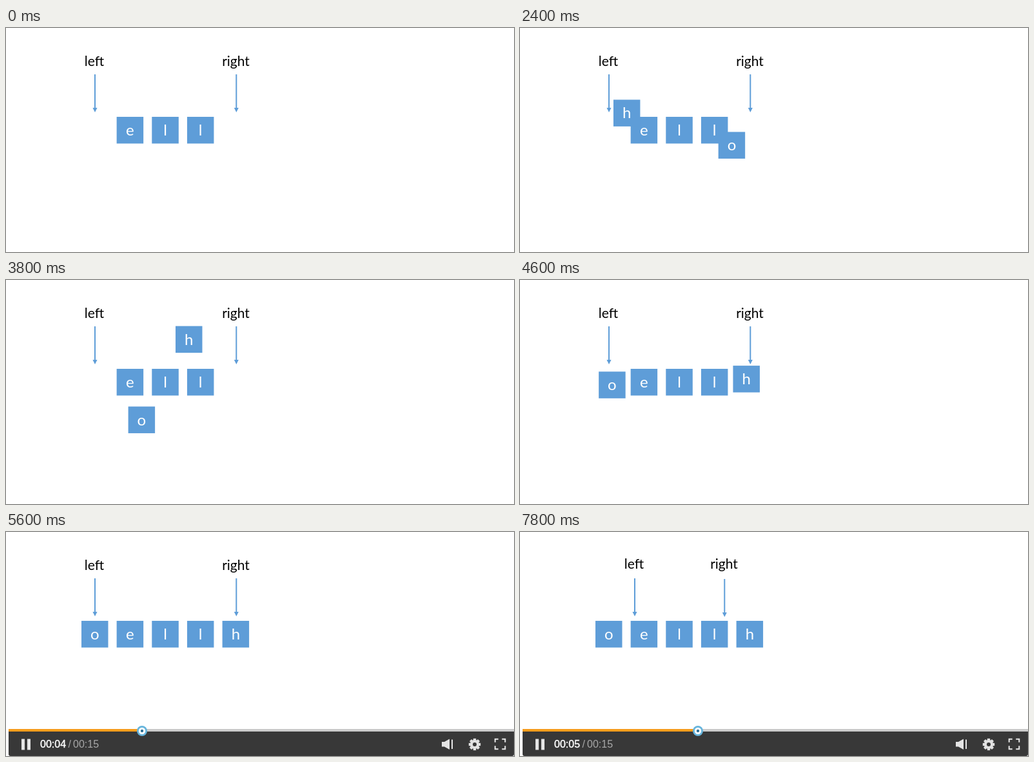
An HTML page with a canvas that plays this animation: 788x348 px, repeating every 8 s.

```html
<!DOCTYPE html>
<html lang="en">
<head>
<meta charset="utf-8">
<title>Swap with two pointers</title>
<style>
  html, body { margin: 0; width: 100%; height: 100%; overflow: hidden; background: #fff; }
  canvas { display: block; }
</style>
</head>
<body>
<canvas id="stage" width="788" height="348"></canvas>
<script>
const ctx = document.getElementById('stage').getContext('2d');
const LOOP = 8000, STEP = 200;
const BLUE = '#5e9dd8';
const SIZE = 41.5, ROW = 138, FIRST = 117, PITCH = 54.65;
const SPAN = PITCH * 4;

const clamp = v => Math.max(0, Math.min(1, v));
const slotX = i => FIRST + PITCH * i;

function rect(x, y, w, h, color) {
  ctx.fillStyle = color;
  ctx.fillRect(x, y, w, h);
}

function disc(x, y, r, color) {
  ctx.fillStyle = color;
  ctx.beginPath();
  ctx.arc(x, y, r, 0, Math.PI * 2);
  ctx.fill();
}

function poly(points, color) {
  ctx.fillStyle = color;
  ctx.beginPath();
  points.forEach(([x, y]) => ctx.lineTo(x, y));
  ctx.fill();
}

function text(str, x, y, font, color, align = 'center') {
  ctx.font = font;
  ctx.fillStyle = color;
  ctx.textAlign = align;
  ctx.fillText(str, x, y);
}

function tile(letter, x, y) {
  rect(x, y, SIZE, SIZE, BLUE);
  text(letter, x + SIZE / 2, y + 29, '24px Lato, Carlito, sans-serif', '#fff');
}

function pointer(label, textX, arrowX, lift, drop) {
  text(label, textX, 58.5 - lift, '21px Lato, Carlito, sans-serif', '#000');
  rect(arrowX - 1, 72 + drop, 2, 53, BLUE);
  poly([[arrowX - 3.5, 124 + drop], [arrowX + 3.5, 124 + drop], [arrowX, 131 + drop]], BLUE);
}

// Height (0..1) of a flat-topped arc: straight flanks joined by a curve.
function arc(p) {
  const q = Math.min(p, 1 - p), flank = 0.27, rise = 0.74;
  if (q < flank) return rise * q / flank;
  const u = (0.5 - q) / (0.5 - flank);
  return 1 - (1 - rise) * Math.pow(u, 2.3);
}

// Pointers ease in briefly, then move at a steady pace.
function pointerShift(t) {
  const speed = 0.0254, ramp = 200, d = t - 6225;
  if (d < -ramp) return 0;
  if (d < ramp) return speed * (d + ramp) ** 2 / (4 * ramp);
  return speed * d;
}

function gear(x, y) {
  ctx.save();
  ctx.translate(x, y);
  for (let i = 0; i < 8; i++) {
    rect(-2.2, -9.2, 4.4, 5, '#e2e2e2');
    ctx.rotate(Math.PI / 4);
  }
  disc(0, 0, 7.2, '#e2e2e2');
  disc(0, 0, 3, '#383838');
  ctx.restore();
}

function corners(x, y, size) {
  ctx.strokeStyle = '#e8e8e8';
  ctx.lineWidth = 2;
  ctx.beginPath();
  for (const sx of [-1, 1]) for (const sy of [-1, 1]) {
    ctx.moveTo(x + sx * (size - 5), y + sy * size);
    ctx.lineTo(x + sx * size, y + sy * size);
    ctx.lineTo(x + sx * size, y + sy * (size - 5));
  }
  ctx.stroke();
}

function player(t) {
  const tick = Math.max(0, Math.floor((t - 5200) / 500));
  const knob = 211 + 13 * tick;
  const font = '16px "Liberation Sans", Arial, sans-serif';

  ctx.globalAlpha = clamp((t - 5000) / 500);
  ctx.fillStyle = '#383838';
  ctx.beginPath();
  ctx.roundRect(4, 309, 784, 39, [0, 0, 3, 3]);
  ctx.fill();
  rect(4, 306, 784, 4, '#cbcbcb');
  rect(4, 306, knob - 4, 4, '#f99d1c');
  disc(knob, 309, 8, '#67b5dc');
  disc(knob, 309, 5.2, '#fff');
  disc(knob, 309, 2.2, '#2b6f96');

  rect(24, 321.5, 5, 17, '#e4e4e4');
  rect(33, 321.5, 5, 17, '#e4e4e4');

  const clock = tick < 4 ? '00:04' : '00:05';
  text(clock, 53, 335, font, '#fff', 'left');
  ctx.strokeStyle = '#fff';
  ctx.lineWidth = 0.4;
  ctx.strokeText(clock, 53, 335);
  text('/', 96.5, 335, font, '#a8a8a8', 'left');
  text('00:15', 104, 335, font, '#a8a8a8', 'left');

  poly([[676, 326], [680, 326], [688, 321.5], [688, 338], [680, 333.5], [676, 333.5]], '#e4e4e4');
  rect(691, 322.5, 2, 14.5, '#e4e4e4');
  gear(727, 330);
  corners(766.5, 329.5, 7.8);
  ctx.globalAlpha = 1;
}

function draw(t) {
  rect(0, 0, 788, 348, '#fff');

  const shift = pointerShift(t), drift = shift / 40;
  pointer('left', 137 + shift, 138 + shift, drift, 0);
  pointer('right', 356.5 - shift, 357.3 - shift, drift, drift);

  [...'ell'].forEach((c, i) => tile(c, slotX(i + 1), ROW));

  const p = clamp((t - 2069) / 2592);
  ctx.globalAlpha = clamp(t / 600);
  tile('h', FIRST + SPAN * p, ROW - 76 * arc(p));
  tile('o', FIRST + SPAN * (1 - p), ROW + 67 * arc(p));
  ctx.globalAlpha = 1;

  if (t > 5000) player(t);
}

const start = performance.now();
function frame() {
  const t = (performance.now() - start) % LOOP;
  draw(Math.floor(t / STEP) * STEP);
  requestAnimationFrame(frame);
}
frame();
</script>
</body>
</html>
```
